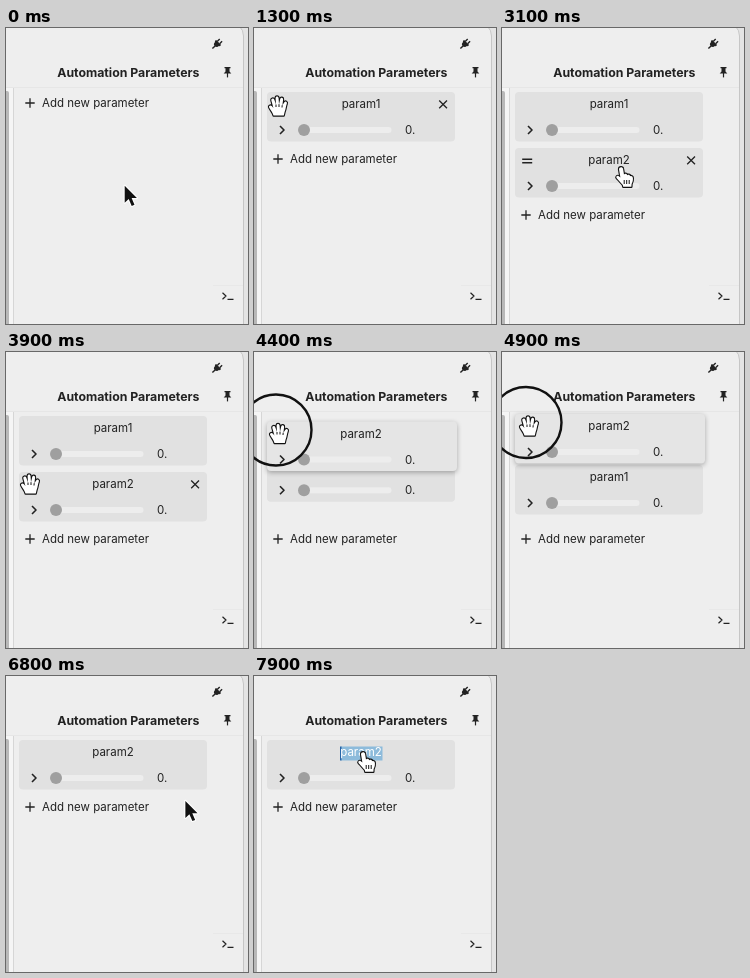
These frames come from a looping animation (242x296 px, 8 s). An HTML page with a canvas:

```html
<!DOCTYPE html>
<html lang="en">
<head>
<meta charset="utf-8">
<title>Automation Parameters</title>
<style>
html, body { margin: 0; width: 100%; height: 100%; overflow: hidden; background: #eee; }
canvas { display: block; width: 242px; height: 296px; }
</style>
</head>
<body>
<canvas id="stage"></canvas>
<script>
const W = 242, H = 296, LOOP = 8000, STEP = 100;
const SLOT1 = 64, SLOT2 = 120, CARD_H = 49.5;
const INK = '#222', FONT = 'Inter, sans-serif';

const canvas = document.getElementById('stage');
const ctx = canvas.getContext('2d');
const ratio = window.devicePixelRatio || 1;
canvas.width = W * ratio;
canvas.height = H * ratio;

// time, x, y of the pointer
const PATH = [
  [0, 118, 157], [100, 118, 157], [700, 21, 74], [1300, 21, 74.5],
  [1700, 21, 129], [2500, 21, 129], [3100, 117, 137], [3400, 104, 153],
  [3900, 21, 128.5], [4100, 21, 128.5], [4400, 22, 78], [4600, 24, 68],
  [4900, 24, 70.5], [5200, 24, 71], [5700, 136, 147], [6400, 187, 130],
  [6700, 187, 130], [7200, 107, 74], [8000, 107, 74]
];

// time, radius of the press ring
const RINGS = [
  [900, 18], [1000, 27], [1100, 0], [1800, 18], [1900, 27], [2000, 0],
  [4000, 18], [4100, 27], [4200, 35.5], [5200, 0], [6600, 18], [6700, 30],
  [6800, 0], [7200, 36], [7300, 0], [7600, 25], [7700, 36], [7800, 0]
];

const FINGER = new Path2D('M-2 2.2C-2-.4 1.8-.6 2.1 2L3 7.6C3.6 6.2 6 6.4 6.2 8.2C7 7.2 9 7.5 9.2 9.2' +
  'C10.2 8.6 11.8 9.2 11.9 11C12.1 14 11.4 15 10.6 17L10.4 19.8H2.2L1.8 18C0 16-2.2 13.4-4.3 11.2' +
  'C-5.6 9.6-3.6 8.2-2.2 9.2L-.6 10.6Z');
const FINGER_LINES = new Path2D('M3.2 13V17M5.7 13V17M8.2 13V17');
const PALM = new Path2D('M-4.5 9.6C-5 7-7 4.5-8.6 2C-10-.2-7.4-1.6-6 .2L-4.6 2L-6.6-5.2' +
  'C-7.2-7.8-4.4-8.4-3.6-6L-2-1.5L-2.4-7.8C-2.4-10.2 .4-10.2 .6-7.8L1-1.8L2.2-7' +
  'C2.8-9.2 5.4-8.6 5.1-6.2L4.4-.8L6.2-3.6C7.4-5.6 9.6-4.2 8.8-2.2C7.6 .8 8 3 6.6 6L5.8 9.6Z');
const ARROW = new Path2D('M0 0V17L4 13.4L7 20.2L9.8 19L6.9 12.4H12.2Z');

const clamp = v => Math.max(0, Math.min(1, v));
const ease = v => v * v * (3 - 2 * v);
const mix = (a, b, t, from, to) => a + (b - a) * ease(clamp((t - from) / (to - from)));

function pointerAt(t) {
  const i = PATH.findIndex(k => k[0] > t);
  const a = PATH[i - 1], b = PATH[i];
  return { x: mix(a[1], b[1], t, a[0], b[0]), y: mix(a[2], b[2], t, a[0], b[0]) };
}

function ringAt(t) {
  let r = 0;
  for (const [time, radius] of RINGS) if (t >= time) r = radius;
  return r;
}

function rect(x, y, w, h, color, r = 0) {
  ctx.fillStyle = color;
  ctx.beginPath();
  ctx.roundRect(x, y, w, h, r);
  ctx.fill();
}

function lines(d, width, color = INK) {
  ctx.strokeStyle = color;
  ctx.lineWidth = width;
  ctx.stroke(new Path2D(d));
}

function text(str, x, y, size = 11.5, align = 'left', weight = 400, color = INK) {
  ctx.font = `${weight} ${size}px ${FONT}`;
  ctx.textAlign = align;
  ctx.fillStyle = color;
  ctx.fillText(str, x, y);
}

function at(x, y, draw, angle = 0) {
  ctx.save();
  ctx.translate(x, y);
  ctx.rotate(angle);
  draw();
  ctx.restore();
}

function drawWindow() {
  rect(0, 0, W, H, '#e4e4e4');
  ctx.beginPath();
  ctx.roundRect(-20, -6, 257.5, 340, 14);
  ctx.fillStyle = '#eee';
  ctx.fill();
  ctx.strokeStyle = '#c6c6c6';
  ctx.lineWidth = 1;
  ctx.stroke();
  rect(0, 59, 237, 1, '#e6e6e6');
  rect(0, 60, 7, H, '#f5f5f5');
  rect(0, 63, 3, H, '#b8b8b8', [0, 2, 0, 0]);
  rect(7, 60, 1, H, '#d6d6d6');
  rect(207, 257, 30, 1, '#e8e8e8');

  text('Automation Parameters', 122.3, 48.6, 12.3, 'center', 700);
  at(211, 16, () => {
    rect(-3.6, -2.2, 7.2, 2, INK, .6);
    rect(-2.8, -1, 5.6, 4, INK, [0, 0, 2.8, 2.8]);
    lines('M-1.7-5.5V-2M1.7-5.5V-2M0 2V6.5', 1.4);
  }, Math.PI / 4);
  at(221.5, 44, () => {
    ctx.fillStyle = INK;
    ctx.fill(new Path2D('M-3-5H3V-3.7H2V-.6L3.8 1.6H-3.8L-2-.6V-3.7H-3Z'));
    lines('M0 1V5.4', 1.2);
  });
  lines('M216.5 264.8L220 268L216.5 271.2M221.5 271.3H227.5', 1.2);
}

function drawCard(card, hovered) {
  at(0, card.y, () => {
    ctx.save();
    if (card.lifted) {
      ctx.shadowColor = 'rgba(0,0,0,.3)';
      ctx.shadowBlur = 5 * ratio;
      ctx.shadowOffsetY = 1.5 * ratio;
    }
    rect(13, 0, card.lifted ? 190 : 188, CARD_H, card.lifted ? '#e5e5e5' : '#e1e1e1', 4);
    ctx.restore();
    if (card.editing) {
      rect(87, 6.5, 41.5, 14, '#8dbbdb');
      rect(86, 6.5, 1.5, 14, '#2765a8');
    }
    text(card.name, 107, 16, 11.5, 'center', 400, card.editing ? '#fff' : INK);
    lines('M26 34L30 38L26 42', 1.6);
    rect(44, 35, 93.5, 6, '#ededed', 3);
    ctx.fillStyle = '#9f9f9f';
    ctx.beginPath();
    ctx.arc(50, 38, 6, 0, Math.PI * 2);
    ctx.fill();
    text('0.', 151, 42);
    if (hovered) {
      lines('M20.2 11.2H30.2M20.2 14.7H30.2', 1.4);
      lines('M185.2 8.5L193 16.3M193 8.5L185.2 16.3', 1.3);
    }
  });
}

function drawAdd(y) {
  lines(`M19.3 ${y}H28.7M24 ${y - 4.7}V${y + 4.7}`, 1.3);
  text('Add new parameter', 36, y + 4.2);
}

function cardsAt(t, p) {
  const one = { name: 'param1', y: SLOT1 };
  const two = { name: 'param2', y: SLOT2 };
  if (t < 1100) return [];
  if (t < 2000) return [one];
  if (t >= 4100 && t < 5400) {
    two.lifted = true;
    two.y = t < 5200 ? SLOT2 + p.y - 128.5 : 62.5;
    one.y = mix(SLOT1, 113, t, 4200, 4500);
  } else if (t >= 5400) {
    two.y = SLOT1;
    one.y = SLOT2;
  }
  if (t >= 6800) {
    two.editing = t >= 7800;
    return [two];
  }
  return [one, two];
}

function drawCursor(kind, p) {
  const outlined = (path, fill, edge, width) => {
    ctx.fillStyle = fill;
    ctx.strokeStyle = edge;
    ctx.lineWidth = width;
    ctx.stroke(path);
    ctx.fill(path);
  };
  if (kind === 'arrow') {
    at(p.x + .7, p.y + .7, () => outlined(ARROW, '#111', '#fff', 2.2));
  } else if (kind === 'finger') {
    at(p.x + 2, p.y + 2, () => {
      outlined(FINGER, '#fff', '#111', 2.2);
      ctx.strokeStyle = '#111';
      ctx.lineWidth = 1;
      ctx.stroke(FINGER_LINES);
    });
  } else {
    at(p.x + 3, p.y + 3.5, () => {
      outlined(PALM, '#fff', '#111', 2.2);
      lines('M-2-1.5V1M1-1.8V1M4.2-.8L4 1.5', 1, '#111');
    });
  }
}

function render(t) {
  ctx.setTransform(ratio, 0, 0, ratio, 0, 0);
  ctx.lineJoin = 'round';
  const p = pointerAt(t);
  const cards = cardsAt(t, p);
  const addY = 75 + 56 * cards.length;
  const hover = cards.find(c => p.x > 13 && p.x < 201 && p.y >= c.y && p.y < c.y + 25);
  const overAdd = Math.abs(p.y - addY) < 11 && p.x < 148;

  drawWindow();
  drawAdd(addY);
  for (const c of cards) drawCard(c, c === hover && !c.lifted && !c.editing);

  const r = ringAt(t);
  if (r) {
    ctx.beginPath();
    ctx.arc(p.x, p.y, r, 0, Math.PI * 2);
    ctx.strokeStyle = '#111';
    ctx.lineWidth = 2.4;
    ctx.stroke();
  }
  const dragging = cards.some(c => c.lifted) && t < 5300;
  const onHandle = hover && p.x < 40;
  drawCursor(dragging || onHandle ? 'palm' : hover || overAdd ? 'finger' : 'arrow', p);
}

function tick() {
  const t = performance.now() % LOOP;
  render(Math.floor(t / STEP) * STEP);
  requestAnimationFrame(tick);
}
tick();
</script>
</body>
</html>
```
